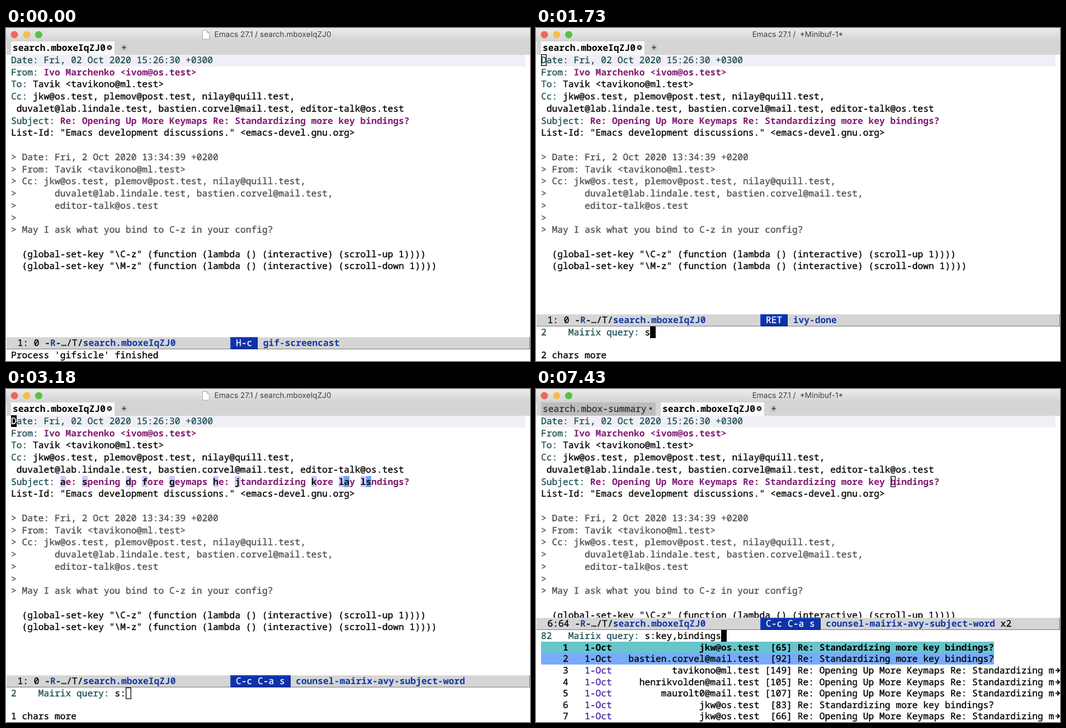
Write an HTML page that moves like this. It is 937 by 597 pixels and loops after 8 s.

```html
<!DOCTYPE html>
<html lang="en">
<head>
<meta charset="utf-8">
<title>Mairix query</title>
<style>
html, body { margin: 0; width: 100%; height: 100%; overflow: hidden; background: #fff; }
#stage { position: relative; width: 937px; height: 597px; overflow: hidden; color: #000;
  font: 500 16.28px "Noto Sans Mono", "DejaVu Sans Mono", monospace; -webkit-text-stroke: .35px;
  text-rendering: geometricPrecision; white-space: pre; }
#stage > *, .abs { position: absolute; }
b, .tab.on { font-weight: 700; -webkit-text-stroke: 0; }
#bar { left: 0; top: 0; width: 937px; height: 24px; background: linear-gradient(#ebebeb, #d3d3d3); }
#lights { left: 0; top: 0; }
#title { top: 0; transform: translateX(-50%); color: #404040; -webkit-text-stroke: 0;
  font: 400 13.6px/25px Inter, "Open Sans", sans-serif; }
#tabs { left: 1px; top: 24px; width: 936px; height: 24px; background: #d5d5d5; }
.tab { top: 0; height: 24px; padding-left: 3px; box-sizing: border-box; line-height: 23px; background: #bdbdbd; color: #333; }
.tab.on { background: #fafafa; color: #000; }
#hl { left: 9px; top: 48px; width: 920px; height: 21px; background: #f1eff5; }
#buf { left: 9px; top: 47px; width: 920px; line-height: 21.73px; overflow: hidden; }
#mode { left: 1px; width: 936px; height: 22px; box-sizing: border-box; line-height: 21px; background: #d5d5d5;
  border: solid #777; border-width: 0 1px 1px 0; box-shadow: inset 0 1px #e6e6e6; }
#mini { left: 9px; bottom: 0; width: 928px; line-height: 20.62px; }
#mini div { position: relative; height: 20.62px; }
i { display: inline-block; vertical-align: top; height: 20.6px; font-style: normal; }
.key { height: 22px; background: #0c33ab; color: #fff;
  box-shadow: inset 1.5px 1.5px #2c52c6, inset -1.5px -1.5px #07217c; }
.blue { color: #1238a6; }
.read { color: #1f4a80; }
.head { color: #1d5157; }
.mag { color: #821b72; }
.cite { color: #4f4f4f; }
.date { color: #4a22a4; }
.block { background: #000; color: #fff; }
.hollow { box-shadow: inset 0 0 0 1.3px #000; }
.lead { background: #d3c5fb; color: #111; }
.lead2 { background: #69a5f8; color: #111; }
.first { background: #67c5cb; }
.second { background: #79abfc; }
</style>
</head>
<body>
<div id="stage">
  <div id="bar"></div>
  <svg id="lights" width="400" height="24">
    <circle cx="15" cy="12" r="6.5" fill="#ee665c"/>
    <circle cx="37" cy="12" r="6.5" fill="#f5bd4c"/>
    <circle cx="58.5" cy="12" r="6.5" fill="#58c140"/>
    <path id="doc" d="M351.5 4.5h8l4 4v11.500h-12zM359.500 4.500v4h4" fill="#fff" stroke="#aaa"/>
  </svg>
  <div id="title"></div>
  <div id="tabs"></div>
  <div id="hl"></div>
  <div id="buf"></div>
  <div id="mode"></div>
  <div id="mini"></div>
</div>
<script>
const $ = id => document.getElementById(id);
const esc = s => s.replace(/&/g, '&amp;').replace(/</g, '&lt;');
const tag = (el, cls, s) => `<${el} class="${cls}">${esc(s)}</${el}>`;
const span = (cls, s) => tag('span', cls, s);
const bold = (cls, s) => tag('b', cls, s);
const box = (cls, s = ' ') => tag('i', cls, s);

const FILE = 'search.mboxeIqZJ0';
const SUBJECT = 'Re: Opening Up More Keymaps Re: Standardizing more key bindings?';
const SHORT = 'Re: Standardizing more key bindings?';
const ME = 'tavikono@ml.test', JKW = 'jkw@os.test', BAS = 'bastien.corvel@mail.test';
const LAB = 'duvalet@lab.lindale.test', LIST = 'editor-talk@os.test';
const CC = `${JKW}, plemov@post.test, nilay@quill.test,`;
const HINTS = '[a]e: [s]pening [d]p [f]ore [g]eymaps [h]e: [j]tandardizing [k]ore [l]{a}y [l]{s}ndings?';

const subjects = {
  plain: bold('mag', SUBJECT),
  hints: `<b class="mag">${HINTS.replace(/\[(.)\]/g, '<i class="lead">$1</i>')
    .replace(/\{(.)\}/g, '<i class="lead2">$1</i>')}</b>`,
  point: `<b class="mag">${SUBJECT.replace('bind', box('hollow', 'b') + 'ind')}</b>`
};

// Message buffer; point is the cursor class on the first letter
const message = ({ point, subject = 'plain' }) => [
  `<span class="head">${point ? box(point, 'D') : 'D'}ate: Fri, 02 Oct 2020 15:26:30 +0300</span>`,
  span('head', 'From: ') + bold('mag', 'Ivo Marchenko <ivom@os.test>'),
  span('head', 'To: ') + esc(`Tavik <${ME}>`),
  span('head', 'Cc: ') + CC,
  ` ${LAB}, ${BAS}, ${LIST}`,
  span('head', 'Subject: ') + subjects[subject],
  esc('List-Id: "Emacs development discussions." <emacs-devel.gnu.org>'),
  '',
  ...['Date: Fri, 2 Oct 2020 13:34:39 +0200', `From: Tavik <${ME}>`, `Cc: ${CC}`,
    `      ${LAB}, ${BAS},`, `      ${LIST}`, '', 'May I ask what you bind to C-z in your config?'
  ].map(s => span('cite', '> ' + s)),
  '',
  '  (global-set-key "\\C-z" (function (lambda () (interactive) (scroll-up 1))))',
  '  (global-set-key "\\M-z" (function (lambda () (interactive) (scroll-down 1))))'
].join('\n');

const modeLine = ({ pos = '1: 0', key, cmd, times = '' }) =>
  `  ${pos} -${bold('read', 'R')}-…/T/${bold('blue', FILE)}          ` +
  `${box('key', ` ${key} `)} ${bold('blue', cmd)}${times}`;

const mail = [[JKW, 65, 1], [BAS, 92, 1], [ME, 149], ['henrikvolden@mail.test', 105],
  ['maurolt0@mail.test', 107], [JKW, 83, 1], [JKW, 66]];
const ARROW = '<svg class="abs" style="left:920px;top:5px" width="8" height="11">' +
  '<path d="M0 5.500h6M3 1.500l4 4-4 4" fill="none" stroke="#000" stroke-width="1.800"/></svg>';
const results = mail.map(([from, size, short], n) => {
  const rest = `${from.padStart(27)} ${`[${size}]`.padStart(5)} ` + (short ? SHORT : SUBJECT.slice(0, 47));
  const num = `    ${n + 1}   `;
  if (n === 0) return `<b>${box('first', num + '1-Oct' + rest)}</b>`;
  if (n === 1) return box('second', num + '1-Oct' + rest);
  return num + span('date', '1-Oct') + rest + (short ? '' : ARROW);
});

const prompt = (n, text, cursor) =>
  span('head', String(n).padEnd(5) + 'Mairix query: ') + text + box(cursor);
const typing = (text, cursor) =>
  [prompt(2, text, cursor), '', `${3 - text.length} chars more`];

const icon = (x, shapes) => `<svg class="abs" style="left:${x - 7}px;top:5px" width="12" height="12">${shapes}</svg>`;
const CROSS = 'M4.2 4.2l3.600 3.600M7.800 4.2l-3.600 3.600';
const closeOn = x => icon(x, `<circle cx="6" cy="6" r="4.500" fill="#3c3c3c"/><path d="${CROSS}" stroke="#fff"/>`);
const closeOff = x => icon(x, `<path d="${CROSS}" stroke="#222" stroke-width="1.600"/>`);
const plus = x => icon(x, '<rect x=".5" y=".5" width="11" height="11" rx="2" fill="#c8c8c8"/><path d="M6 2.500v7M2.500 6h7" stroke="#333" stroke-width="1.500"/>');
const tab = (x, w, cls, name) => `<div class="abs tab ${cls}" style="left:${x - 1}px;width:${w}px">${name}</div>`;
const tabBar = two => two
  ? tab(9, 205, '', 'search.mbox-summary') + closeOff(205) + tab(223, 185, 'on', FILE) + closeOn(399) + plus(425)
  : tab(9, 185, 'on', FILE) + closeOn(185) + plus(211);

const ret = { key: 'RET', cmd: 'ivy-done', point: 'hollow', inMini: true };
const avy = { key: 'C-c C-a s', cmd: 'counsel-mairix-avy-subject-word' };
const twice = { ...avy, times: ' x2', two: true };
const scenes = [
  { at: 0, key: 'H-c', cmd: 'gif-screencast', mini: ["Process 'gifsicle' finished"] },
  { at: 1000, ...ret, mini: typing('', 'block') },
  { at: 1730, ...ret, mini: typing('s', 'block') },
  { at: 2910, ...ret, mini: typing('s:', 'block') },
  { at: 3180, ...avy, point: 'block', subject: 'hints', mini: typing('s:', 'hollow') },
  { at: 4170, ...twice, pos: '6:60', subject: 'hints', mini: [prompt(111, 's:key', 'hollow'), ...results] },
  { at: 7430, ...twice, pos: '6:64', subject: 'point', inMini: true,
    mini: [prompt(82, 's:key,bindings', 'block'), ...results] }
];

function show(s) {
  const modeTop = Math.round(597 - s.mini.length * 20.62 - 22.2);
  $('title').textContent = 'Emacs 27.1 / ' + (s.inMini ? ' *Minibuf-1*' : FILE);
  $('title').style.left = (s.inMini ? 468 : 477) + 'px';
  $('doc').style.display = s.inMini ? 'none' : '';
  $('tabs').innerHTML = tabBar(s.two);
  $('buf').innerHTML = message(s);
  $('buf').style.height = modeTop - 47 + 'px';
  $('mode').innerHTML = modeLine(s);
  $('mode').style.top = modeTop + 'px';
  $('mini').innerHTML = s.mini.map(line => `<div>${line}</div>`).join('');
}

let start, current;
function tick(now) {
  start ??= now;
  const t = (now - start) % 8000;
  const scene = scenes.findLast(s => s.at <= t);
  if (scene !== current) show(current = scene);
  requestAnimationFrame(tick);
}
show(current = scenes[0]);
requestAnimationFrame(tick);
</script>
</body>
</html>
```
